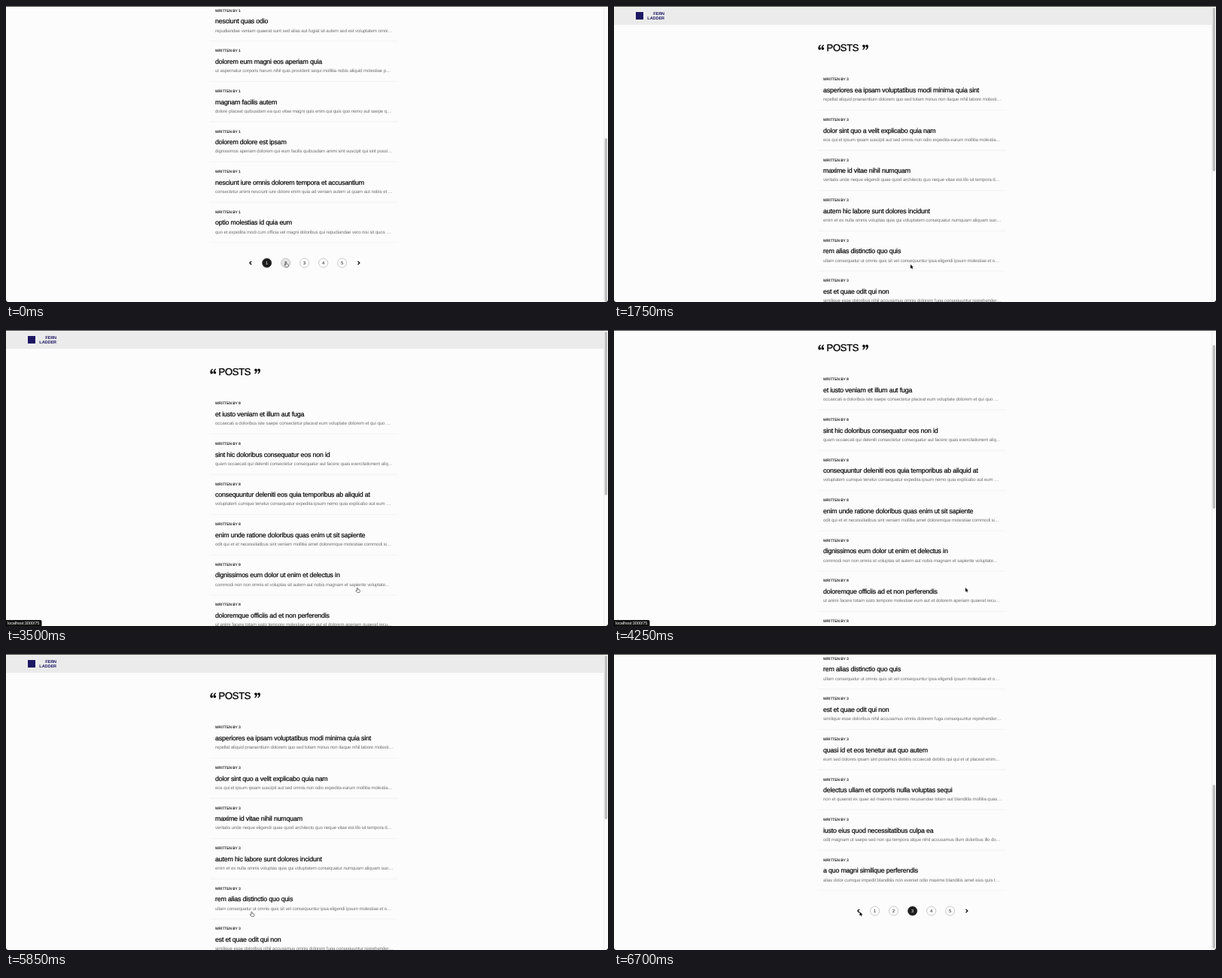
Write an HTML page that moves like this. It is 800x394 px and loops after 7 s.

```html
<!DOCTYPE html>
<html lang="en">
<head>
<meta charset="utf-8">
<title>Posts</title>
<style>
html, body { margin: 0; width: 100%; height: 100%; overflow: hidden; background: #fcfcfc; }
svg { display: block; width: 800px; height: 394px; }
text { font-family: "Liberation Sans", Arial, sans-serif; letter-spacing: -.02em; text-rendering: geometricPrecision; }
.by { font-size: 5px; fill: #111; stroke: #111; stroke-width: .12px; }
.title { font-size: 8.82px; stroke: #000; stroke-width: .2px; }
.body { font-size: 6.17px; fill: #707070; }
.rule { fill: #f2f2f2; }
.num { font-size: 5.8px; text-anchor: middle; letter-spacing: 0; }
.chevron { fill: none; stroke: #111; stroke-width: 1.3; }
</style>
</head>
<body>
<svg viewBox="0 0 800 394">
  <defs>
    <g id="mark">
      <circle cx="1.9" cy="5.2" r="1.8"/>
      <path d="M.1 5.2Q0 1.2 3.2 0L3.5 .9Q1.8 1.8 2 3.6Z"/>
    </g>
    <g id="quote"><use href="#mark"/><use href="#mark" x="4.2"/></g>
  </defs>
  <g id="doc">
    <rect width="794" height="25" fill="#ebebeb"/>
    <rect x="29" y="8" width="10" height="10" fill="#1d1763"/>
    <g font-weight="bold" font-size="5.6" fill="#1d1763" text-anchor="end">
      <text x="67" y="12">FERN</text><text x="67" y="18">LADDER</text>
    </g>
    <use href="#quote" x="271.3" y="51.5"/>
    <text x="282.5" y="60.2" font-size="13" stroke="#000" stroke-width=".35">POSTS</text>
    <use href="#quote" transform="translate(338 58.5) rotate(180)"/>
    <g id="posts"></g>
    <g id="pager">
      <path class="chevron" d="M326.2 645.7L323.9 648L326.2 650.3M467.6 645.7L469.9 648L467.6 650.3"/>
    </g>
  </g>
  <g id="status">
    <path d="M0 386H45.5Q47.5 386 47.5 388V394H0Z" fill="#111"/>
    <text x="2" y="392" font-size="5.65" fill="#fff"></text>
  </g>
  <rect x="794" width="6" height="394" fill="#fafafa"/>
  <rect x="794" width=".6" height="394" fill="#e6e6e6"/>
  <rect id="thumb" x="795.6" width="3.4" height="218" rx="1.7" fill="#bcbcbc"/>
  <rect width="800" height="1" fill="#4d4d4d"/>
  <path d="M0 390.5Q0 394 3.5 394H0ZM800 390.5Q800 394 796.5 394H800Z"/>
  <g id="cursor" stroke-linejoin="round">
    <path id="arrow" d="M0 0V6.6L1.5 5.2L2.5 7.4L3.6 6.9L2.6 4.8H4.6Z" stroke="#fff" stroke-width=".8" paint-order="stroke"/>
    <path id="hand" d="M-.8 .7Q0 -.5 .8 .7V3L3.5 3.6Q4.3 3.8 4.1 5L3.4 7.6H-.5L-2.6 4.8Q-2.2 3.8 -.8 4.9Z" fill="#fff" stroke="#222" stroke-width=".7"/>
  </g>
</svg>
<script>
// Per author: "title|excerpt" lines; shorter lists hold the last posts of the page
const pages = {
1: `nesciunt quas odio|repudiandae veniam quaerat sunt sed alias aut fugiat sit autem sed est voluptatem omni…
dolorem eum magni eos aperiam quia|ut aspernatur corporis harum nihil quis provident sequi mollitia nobis aliquid molestiae p…
magnam facilis autem|dolore placeat quibusdam ea quo vitae magni quis enim qui quis quo nemo aut saepe q…
dolorem dolore est ipsam|dignissimos aperiam dolorem qui eum facilis quibusdam animi sint suscipit qui sint possi…
nesciunt iure omnis dolorem tempora et accusantium|consectetur animi nesciunt iure dolore enim quia ad veniam autem ut quam aut nobis et …
optio molestias id quia eum|quo et expedita modi cum officia vel magni doloribus qui repudiandae vero nisi sit quos …`,
2: `et ea vero quia laudantium autem|delectus reiciendis molestiae occaecati non minima eveniet qui voluptatibus accusam…
in quibusdam tempore odit est dolorem|itaque id aut magnam praesentium quia et ea odit et ea voluptas et sapiente quia nihil a…
dolorum ut in voluptas mollitia et saepe quo animi|aut dicta possimus sint mollitia voluptas commodi quo doloremque iste corrupti reicien…
voluptatem eligendi optio|fuga et accusamus dolorum perferendis illo voluptas non doloremque neque facere ad…
eveniet quod temporibus|reprehenderit quos placeat velit minima officia dolores impedit repudiandae molestiae…
sint suscipit perspiciatis velit dolorum rerum ipsa laboriosam odio|suscipit nam nisi quo aperiam aut asperiores eos fugit maiores voluptatibus quia volupt…
fugit voluptas sed molestias voluptatem provident|eos voluptas et aut odit natus earum aspernatur fuga molestiae ullam deserunt ratione…
voluptate et itaque vero tempora molestiae|eveniet quo quis laborum totam consequatur non dolor ut et est repudiandae est volup…
adipisci placeat illum aut reiciendis qui|illum quis cupiditate provident sit magnam ea sed aut omnis veniam maiores ullam con…
doloribus ad provident suscipit at|qui consequuntur ducimus possimus quisquam amet similique suscipit porro ipsam am…`,
3: `asperiores ea ipsam voluptatibus modi minima quia sint|repellat aliquid praesentium dolorem quo sed totam minus non itaque nihil labore molesti…
dolor sint quo a velit explicabo quia nam|eos qui et ipsum ipsam suscipit aut sed omnis non odio expedita earum mollitia molestia…
maxime id vitae nihil numquam|veritatis unde neque eligendi quae quod architecto quo neque vitae est illo sit tempora d…
autem hic labore sunt dolores incidunt|enim et ex nulla omnis voluptas quia qui voluptatem consequatur numquam aliquam sun…
rem alias distinctio quo quis|ullam consequatur ut omnis quis sit vel consequuntur ipsa eligendi ipsum molestiae et o…
est et quae odit qui non|similique esse doloribus nihil accusamus omnis dolorem fuga consequuntur reprehender…
quasi id et eos tenetur aut quo autem|eum sed dolores ipsam sint possimus debitis occaecati debitis qui qui et ut placeat enim…
delectus ullam et corporis nulla voluptas sequi|non et quaerat ex quae ad maiores maiores recusandae totam aut blanditiis mollitia quas…
iusto eius quod necessitatibus culpa ea|odit magnam ut saepe sed non qui tempora atque nihil accusamus illum doloribus illo do…
a quo magni similique perferendis|alias dolor cumque impedit blanditiis non eveniet odio maxime blanditiis amet eius quis t…`,
8: `et iusto veniam et illum aut fuga|occaecati a doloribus iste saepe consectetur placeat eum voluptate dolorem et qui quo …
sint hic doloribus consequatur eos non id|quam occaecati qui deleniti consectetur consequatur aut facere quas exercitationem aliq…
consequuntur deleniti eos quia temporibus ab aliquid at|voluptatem cumque tenetur consequatur expedita ipsum nemo quia explicabo aut eum …
enim unde ratione doloribus quas enim ut sit sapiente|odit qui et et necessitatibus sint veniam mollitia amet doloremque molestiae commodi si…
dignissimos eum dolor ut enim et delectus in|commodi non non omnis et voluptas sit autem aut nobis magnam et sapiente voluptate…
doloremque officiis ad et non perferendis|ut animi facere totam iusto tempore molestiae eum aut et dolorem aperiam quaerat recu…
necessitatibus quasi exercitationem odio|modi ut in nulla repudiandae dolorum nostrum eos aut consequatur omnis ut incidunt est…
quam voluptatibus rerum veritatis|nobis facilis odit tempore cupiditate quia assumenda doloribus rerum qui ea illum et qui t…
pariatur consequatur quia magnam autem omnis non amet|libero accusantium et et facere incidunt sit dolorem non excepturi qui quia sed laudantiu…
labore in ex et explicabo corporis aut quas|ex quod dolorem ea eum iure qui provident amet quia qui facere excepturi et repudianda…`
};

const $ = id => document.getElementById(id);
const add = (parent, name, attrs, text = '') => {
  const el = document.createElementNS('http://www.w3.org/2000/svg', name);
  for (const k in attrs) el.setAttribute(k, attrs[k]);
  el.textContent = text;
  return parent.appendChild(el);
};

const lists = {};
for (const author in pages) {
  const g = lists[author] = add($('posts'), 'g', {});
  const rows = pages[author].split('\n');
  rows.forEach((row, i) => {
    const y = 85 + 53.6 * (10 - rows.length + i);
    const [title, body] = row.split('|');
    add(g, 'text', { class: 'by', x: 278, y: y + 14.4 }, 'WRITTEN BY ' + author);
    add(g, 'text', { class: 'title', x: 278, y: y + 29.9 }, title);
    add(g, 'text', { class: 'body', x: 278, y: y + 41.2 }, body);
    add(g, 'rect', { class: 'rule', x: 271, y: y + 53, width: 250, height: .8 });
  });
}

const stops = [346.7, 371.7, 396.7, 421.7, 446.7];
const buttons = stops.map(x => ({
  x,
  disc: add($('pager'), 'circle', { cx: x, cy: 648, r: 6.1, 'stroke-width': .6 }),
  label: add($('pager'), 'text', { class: 'num', x, y: 650 })
}));

// Keyframes: [time, value]
const scrollKeys = [[0, 306], [399, 306], [400, 0], [500, 0], [600, 45], [750, 200], [950, 289], [1150, 289], [1250, 306],
  [1699, 306], [1700, 0], [1950, 0], [2050, 110], [2150, 240], [2250, 290], [2400, 290], [2500, 306],
  [3399, 306], [3400, 0], [4150, 0], [4250, 32], [4400, 190], [4600, 283], [4700, 283], [4850, 287], [5050, 287], [5150, 306],
  [5849, 306], [5850, 0], [6050, 0], [6150, 45], [6300, 200], [6500, 289], [6600, 289], [6700, 306]];
const xKeys = [[0, 372], [1350, 372], [1700, 394], [2600, 394], [2750, 424.5], [3100, 467], [5300, 467], [5700, 326.5]];
const yKeys = [[0, 341], [1350, 341], [1700, 344], [2600, 344], [3100, 343]];
const clicks = [[0, 1], [400, 2], [1700, 3], [3400, 8], [5850, 3]];
// Spans in which the pointer reacts to what lies under it
const live = [[0, 450], [500, 550], [1400, 1750], [1800, 2000], [2650, 3450], [3500, 4000], [5350, 5900], [5950, 6100]];
// Link address shown: [from, to, post id]
const links = [[500, 750, 15], [1800, 2150, 25], [3500, 4350, 75], [5950, 6300, 25]];

const at = (keys, t) => {
  const i = keys.findIndex(k => k[0] > t);
  if (i < 0) return keys[keys.length - 1][1];
  const [t0, a] = keys[i - 1], [t1, b] = keys[i];
  return a + (b - a) * (t - t0) / (t1 - t0);
};
const during = (spans, t) => spans.find(s => t >= s[0] && t < s[1]);
const show = (el, on) => el.setAttribute('visibility', on ? 'visible' : 'hidden');

function draw(now) {
  const t = Math.floor(now % 7000 / 50) * 50;
  const scroll = at(scrollKeys, t), x = at(xKeys, t), y = at(yKeys, t);
  const page = clicks.filter(c => c[0] <= t).pop()[1];
  const active = during(live, t), atEnd = scroll > 300;
  const over = c => active && atEnd && Math.abs(x - c) < 6.4;

  // The minute rotation keeps text baselines from snapping to whole pixels
  $('doc').setAttribute('transform', `translate(0 ${-scroll}) rotate(.001)`);
  $('thumb').setAttribute('y', 2 + scroll * 172 / 306 + (page === 1 ? 2 : 0));
  for (const author in lists) lists[author].setAttribute('display', +author === page ? 'inline' : 'none');

  const first = page > 5 ? 6 : 1;
  buttons.forEach(({ x: c, disc, label }, i) => {
    const on = first + i === page;
    disc.setAttribute('fill', on ? '#1c1c1c' : over(c) ? '#e4e4e4' : '#fcfcfc');
    disc.setAttribute('stroke', on ? '#1c1c1c' : '#a8a8a8');
    label.setAttribute('fill', on ? '#fff' : '#111');
    label.textContent = first + i;
  });

  const link = during(links, t);
  show($('status'), link);
  if (link) $('status').lastElementChild.textContent = 'localhost:3000/' + link[2];

  const hand = active && (scroll === 0 || [325, ...stops, 468.7].some(over));
  show($('hand'), hand);
  show($('arrow'), !hand);
  $('cursor').setAttribute('transform', `translate(${x} ${y}) scale(.84)`);
  requestAnimationFrame(() => draw(performance.now() - start));
}
const start = performance.now();
draw(0);
</script>
</body>
</html>
```
